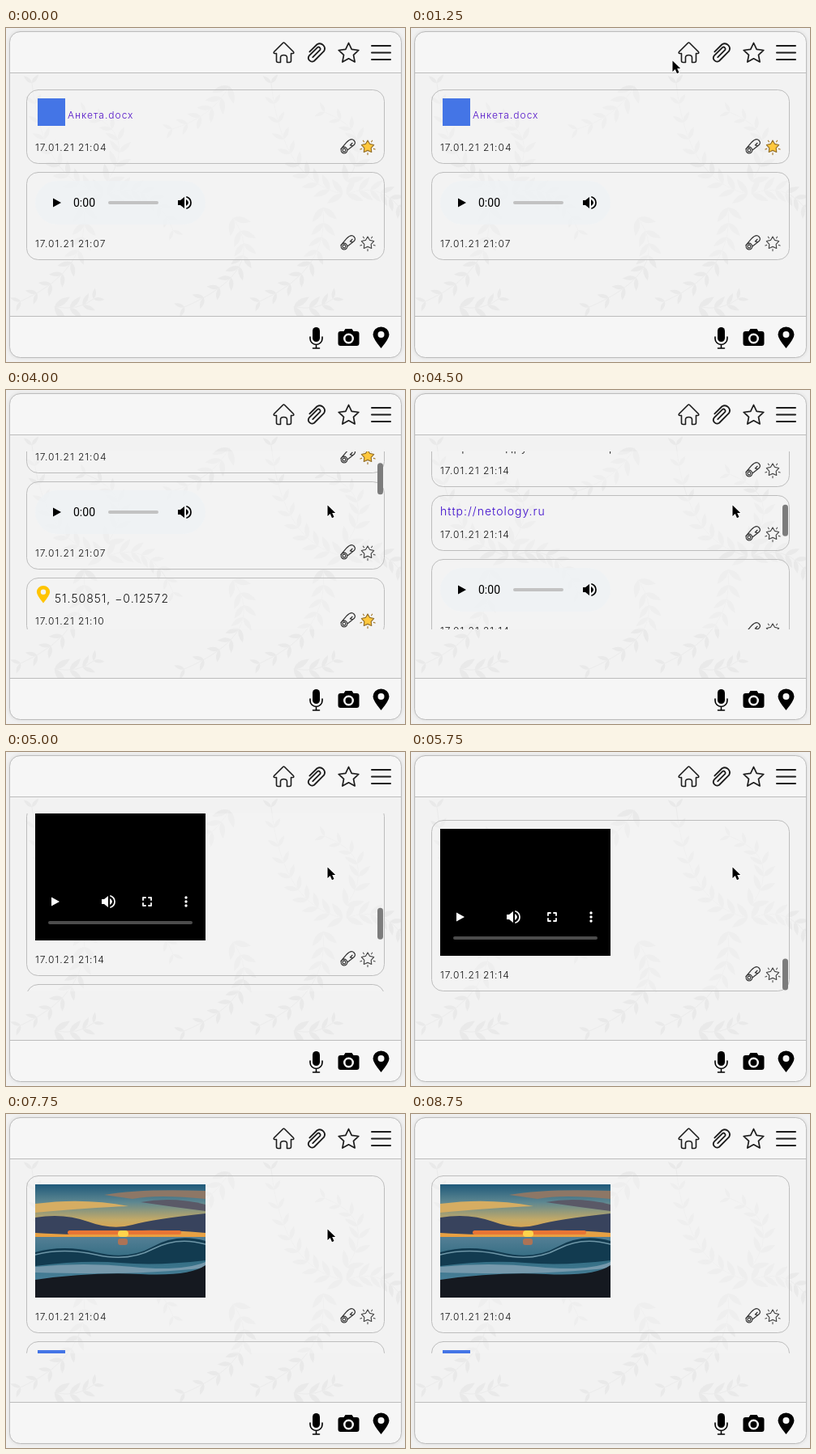
Recreate the animation shown at these times as an HTML page with a canvas. Size 492x413 px, loop 9.5 s.

```html
<!DOCTYPE html>
<html lang="ru">
<head>
<meta charset="utf-8">
<title>Messages</title>
<style>
html, body { margin: 0; width: 100%; height: 100%; overflow: hidden; background: #f1f1f1; }
canvas { display: block; }
</style>
</head>
<body>
<canvas id="stage" width="492" height="413"></canvas>
<script>
const ctx = document.getElementById('stage').getContext('2d');
const LOOP = 9500, STEP = 250, LIST_TOP = 76, LIST_HEIGHT = 220, GAP = 10;
const INK = '#1c1c1c';

// Each entry holds from its time until the next one.
const cursorTrack = [
  [0, null], [750, [441, 47]], [1000, [385, 45]], [1250, [322, 40]], [2000, [361, 40]],
  [3000, [374, 80]], [3250, [396, 142]], [8250, [404, 170]], [8500, [418, 250]], [8750, null]
];
const scrollTrack = [
  [0, 0], [4000, 65], [4250, 190], [4500, 330], [4750, 470], [5000, 593], [5250, 720],
  [5500, 850], [5750, 915], [6250, 630], [6500, 305], [6750, 95], [7000, 0]
];
const valueAt = (track, t) => track.filter(([start]) => start <= t).pop()[1];
const between = (t, a, b) => t >= a && t < b;

function at(x, y, draw, scale = 1, angle = 0) {
  ctx.save();
  ctx.translate(x, y);
  ctx.rotate(angle);
  ctx.scale(scale, scale);
  draw();
  ctx.restore();
}
function fill(path, color = '#000') {
  ctx.fillStyle = color;
  ctx.fill(new Path2D(path), 'evenodd');
}
function stroke(path, width = 1.7, color = INK) {
  ctx.strokeStyle = color;
  ctx.lineWidth = width;
  ctx.lineCap = ctx.lineJoin = 'round';
  ctx.stroke(new Path2D(path));
}
function rect(x, y, w, h, color, r = 0) {
  ctx.fillStyle = color;
  ctx.beginPath();
  ctx.roundRect(x, y, w, h, r);
  ctx.fill();
}
function text(str, x, y, size, color = '#111', font = '300', family = 'Inter', spacing = 1) {
  ctx.font = `${font} ${size}px ${family}, sans-serif`;
  ctx.letterSpacing = spacing + 'px';
  ctx.fillStyle = color;
  ctx.fillText(str, x, y);
}
function gradient(y0, y1, ...colors) {
  const g = ctx.createLinearGradient(0, y0, 0, y1);
  colors.forEach((c, i) => g.addColorStop(i / (colors.length - 1), c));
  return g;
}
function starPath(outer, inner) {
  let d = '';
  for (let i = 0; i < 10; i++) {
    const a = i * Math.PI / 5 - Math.PI / 2, r = i % 2 ? inner : outer;
    d += `${i ? 'L' : 'M'}${r * Math.cos(a)} ${r * Math.sin(a)}`;
  }
  return d + 'Z';
}

// Wallpaper
function leaf(x, y, angle, size) {
  at(x, y, () => fill('M0 0Q7 -6 18 0Q7 6 0 0', '#e9e9e9'), size, angle);
}
function branch(x0, y0, cx, cy, x1, y1, count) {
  stroke(`M${x0} ${y0}Q${cx} ${cy} ${x1} ${y1}`, 1, '#ebebeb');
  for (let i = 0; i <= count; i++) {
    const u = i / count, v = 1 - u;
    const x = v * v * x0 + 2 * u * v * cx + u * u * x1;
    const y = v * v * y0 + 2 * u * v * cy + u * u * y1;
    const a = Math.atan2(v * (cy - y0) + u * (y1 - cy), v * (cx - x0) + u * (x1 - cx));
    const size = 1.25 - 0.5 * u;
    leaf(x, y, a + 0.75, size);
    leaf(x, y, a - 0.75, size);
  }
}
function wreath() {
  branch(120, 205, 45, 190, 32, 68, 9);
  branch(125, 190, 165, 130, 98, 104, 6);
  branch(125, 205, 180, 185, 206, 250, 7);
  branch(96, 222, 105, 300, 18, 338, 8);
  branch(275, 72, 255, 110, 205, 125, 5);
  branch(280, 235, 325, 300, 220, 345, 8);
  branch(60, 345, 90, 350, 108, 335, 3);
}

// Toolbar and footer
const home = () => stroke('M-1 -12Q0 -13 1 -12L12 -1Q13 1 11 1H9V10Q9 12 7 12H4V6Q4 3 0 3Q-4 3 -4 6V12H-7Q-9 12 -9 10V1H-11Q-13 1 -12 -1Z', 1.6);
const clip = () => stroke('M-7 1H6A2.4 2.4 0 0 0 6 -3.5H-9A4.6 4.6 0 0 0 -9 5.5H8A6.2 6.2 0 0 0 8 -6.5H-5', 1.8);
function mic() {
  rect(-4.5, -13, 9, 18, '#000', 4.5);
  stroke('M-7.5 -1V1A7.5 7.5 0 0 0 7.5 1V-1M0 9V13M-4 13H4', 1.6, '#000');
}
const camera = () => fill('M-10 -7H-6L-4 -10H4L6 -7H10Q13 -7 13 -4V8Q13 11 10 11H-10Q-13 11 -13 8V-4Q-13 -7 -10 -7ZM6.5 2A6.5 6.5 0 1 0 -6.5 2A6.5 6.5 0 1 0 6.5 2ZM4 2A4 4 0 1 1 -4 2A4 4 0 1 1 4 2Z');
const marker = color => fill('M0 13Q-10 1 -10 -4A10 9.5 0 0 1 10 -4Q10 1 0 13ZM4 -4A4 4 0 1 0 -4 -4A4 4 0 1 0 4 -4Z', color);

function frame(hover) {
  ctx.fillStyle = '#f1f1f1';
  ctx.fillRect(0, 0, 492, 413);
  ctx.save();
  ctx.shadowColor = 'rgba(0,0,0,.12)';
  ctx.shadowBlur = 5;
  rect(4.5, 4.5, 483, 403, '#f6f6f6', 13);
  ctx.restore();
  ctx.save();
  ctx.beginPath();
  ctx.rect(5, 56, 482, 300);
  ctx.clip();
  ctx.fillStyle = '#f2f2f2';
  ctx.fillRect(5, 56, 482, 300);
  wreath();
  at(295, 0, wreath);
  ctx.restore();
  stroke('M5 55.5H487M5 356.5H487', 1, '#bcbcbc');
  ctx.beginPath();
  ctx.roundRect(4.5, 4.5, 483, 403, 13);
  ctx.stroke();

  if (hover) rect(327, 15, 32, 39, '#fcfcfc');
  at(342.5, 30.5, home, hover ? 1.18 : 1);
  at(382.5, 30.5, clip, 1, -Math.PI / 4);
  at(422.5, 31.5, () => stroke(starPath(13, 6.3)));
  stroke('M451 22H474M451 30.5H474M451 39H474', 2);
  at(382.5, 383, mic);
  at(422.5, 382, camera);
  at(462.5, 383, () => marker('#000'));
}

// Message contents, with y = 0 at the top of the card
function speaker(color) {
  fill('M-8 -3H-5L0 -7V7L-5 3H-8ZM2 -4Q5 -2 5 0Q5 2 2 4Z', color);
  stroke('M3 -7Q8 -5 8 0Q8 5 3 7', 1.7, color);
}
const play = color => fill('M-5 -5.5L5 0L-5 5.5Z', color);

function documentLink() {
  rect(39, 11, 34, 34, '#4475e6');
  text('Анкета.docx', 76, 36, 12, '#5010c8');
}
function audio() {
  rect(36, 11, 210, 54, 'rgba(239,243,246,.65)', 27);
  at(63, 38, () => play('#000'));
  text('0:00', 83, 43, 14, '#000', '400', 'Roboto', 0);
  rect(126, 36, 62, 4, '#c2c2c2', 2);
  at(220, 38, () => speaker('#000'));
}
function place() {
  at(46, 21, () => marker('#ffc400'), 0.81);
  text('51.50851, −0.12572', 60, 31, 14);
}
function video() {
  rect(36, 11, 210, 157, '#000');
  at(61, 120, () => play('#fff'));
  at(126, 120, () => speaker('#fff'));
  at(174, 120, () => stroke('M-5 -2V-5H-2M2 -5H5V-2M5 2V5H2M-2 5H-5V2', 1.8, '#fff'));
  for (const y of [115, 120, 125]) rect(220.3, y - 1.7, 3.4, 3.4, '#fff', 1.7);
  rect(52, 144, 178, 4, '#4c4c4c', 2);
}
function photo() {
  at(36, 11, () => {
    ctx.beginPath();
    ctx.rect(0, 0, 210, 140);
    ctx.clip();
    rect(0, 0, 210, 66, gradient(0, 66, '#1f597a', '#5d8791', '#c5aa66', '#ee9e3c'));
    fill('M85 13Q130 5 210 8V18Q150 12 120 18Z', '#8d7766');
    fill('M0 24Q60 16 115 27Q65 29 0 35Z', '#d6ad62');
    fill('M130 22Q170 15 210 25V33Q170 28 130 22Z', '#5a5967');
    fill('M0 41Q35 35 65 46T120 50T210 36V60Q140 54 100 59T0 60Z', '#38435d');
    rect(40, 57, 140, 5, '#e87535', 3);
    rect(102, 57, 13, 8, '#ffd34c', 5);
    rect(0, 65, 210, 75, gradient(65, 120, '#547f95', '#326c82', '#4b829b'));
    rect(102, 67, 12, 8, '#ad7355', 3);
    fill('M0 84Q35 74 75 84T145 77T210 70V94Q150 101 105 97T0 101Z', '#123b50');
    stroke('M0 87Q35 78 75 87T145 80T210 74', 1.5, '#6f97a8');
    fill('M0 102Q60 96 120 102T210 96V103Q130 113 0 109Z', '#7699ac');
    fill('M0 118Q70 108 130 111T210 100V140H0Z', '#151920');
  });
}

const card = (height, draw, time, starred = false) => ({ height, draw, time, starred });
const note = (str, color) => card(69, () => text(str, 36, 25, 14, color), '21:14');
const messages = [
  card(92, documentLink, '21:04', true),
  card(109, audio, '21:07'),
  card(74, place, '21:10', true),
  note('Встреча с друзьями в воскресение в 14.00'),
  note('http://netology.ru', '#3a08cc'),
  card(109, audio, '21:14'),
  card(212, video, '21:14'),
  card(109, audio, '21:14'),
  card(212, video, '21:14')
];
const withPhoto = [card(195, photo, '21:04'), ...messages];

function safetyPin() {
  stroke('M-10 0A4 4 0 1 1 -2 0A4 4 0 1 1 -10 0M-8 0A2 2 0 1 1 -4 0A2 2 0 1 1 -8 0M-8 -4L4 -5Q12 -5 12 0Q12 5 6 4L4 1H8M-3 3L5 4', 1.3, '#333');
}
function badge(starred) {
  const path = starPath(8, 4.4);
  if (starred) fill(path, '#ffc83d');
  stroke(path, 1.2, starred ? '#95702b' : '#484848');
  for (let i = 0; i < 5; i++) {
    at(0, 0, () => stroke('M0 7.7V9.6', 1.2, starred ? '#a47a2d' : '#555'), 1, i * Math.PI * 0.4);
  }
}
function drawCard({ height, draw, time, starred }) {
  rect(25.5, 0.5, 441, height - 1, 'rgba(244,244,244,.45)', 14);
  ctx.strokeStyle = '#bdbdbd';
  ctx.lineWidth = 1;
  ctx.stroke();
  draw();
  text('17.01.21 ' + time, 36, height - 16, 12);
  at(421, height - 21, safetyPin, 0.95, -Math.PI / 4);
  at(446, height - 21, () => badge(starred));
}
function list(cards, scroll, showThumb) {
  ctx.save();
  ctx.beginPath();
  ctx.rect(25, LIST_TOP, 442, LIST_HEIGHT);
  ctx.clip();
  let y = LIST_TOP - scroll;
  for (const c of cards) {
    if (y < LIST_TOP + LIST_HEIGHT && y + c.height > LIST_TOP) at(0, y, () => drawCard(c));
    y += c.height + GAP;
  }
  if (showThumb) rect(458, 77.5 + scroll * 178 / 915, 7, 39, '#7c7c7c', 3.5);
  ctx.restore();
}
function pointer() {
  const path = 'M0.5 0.5V14L3.7 11L6 16.2L8.5 15.1L6.2 10H10.2Z';
  stroke(path, 1.8, '#fff');
  fill(path, '#000');
}

function render() {
  const t = Math.floor(performance.now() % LOOP / STEP) * STEP;
  const reloading = t === 2000 || t === 2750;
  const cursor = valueAt(cursorTrack, t);
  frame(between(t, 2000, 3000));
  if (!reloading) {
    list(t >= 7500 ? withPhoto : messages, valueAt(scrollTrack, t), between(t, 4000, 7750));
  }
  if (cursor) at(...cursor, pointer);
  requestAnimationFrame(render);
}
render();
</script>
</body>
</html>
```
